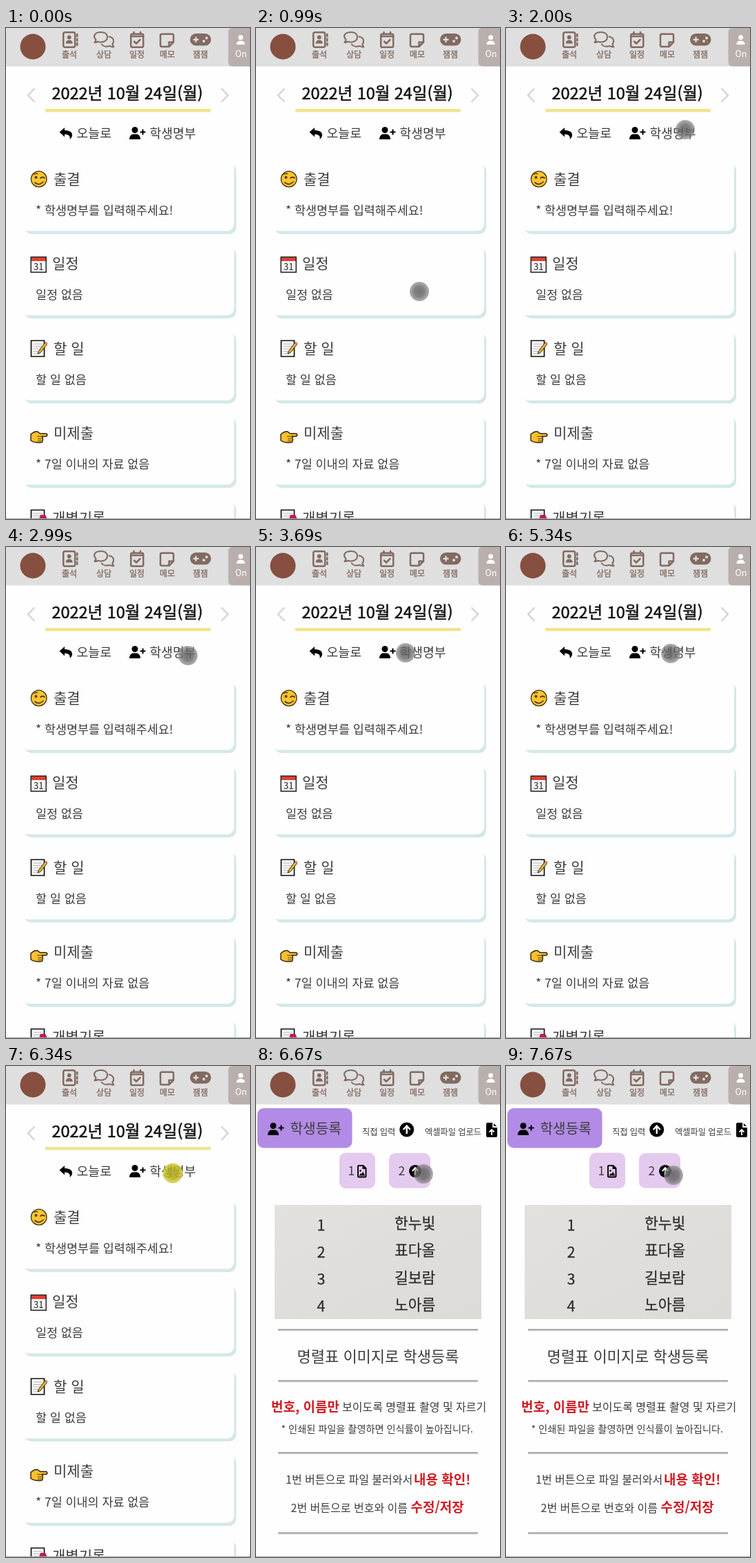
Animation, 354 px wide and 710 px high, one loop 8 s. Source, as an HTML page:

```html
<!DOCTYPE html>
<html lang="ko">
<head>
<meta charset="utf-8">
<style>
  html, body { margin: 0; width: 100%; height: 100%; overflow: hidden; background: #fefefe; }
  svg { display: block; }
  text { font-family: "Noto Sans CJK KR", "Noto Sans CJK", sans-serif; font-weight: 300; fill: #3c3c3c; white-space: pre; }
  .tab text { font-size: 12px; fill: #826a60; stroke: #826a60; stroke-width: .3; }
  .line { fill: none; stroke: #826a60; stroke-width: 2.5; stroke-linejoin: round; stroke-linecap: round; }
  .brown { fill: #826a60; }
  .tab .on { font-size: 12.5px; fill: #fff; stroke: none; }
  .date { font-size: 23.45px; fill: #111; stroke: #111; stroke-width: .5; }
  .head { font-size: 21px; }
  .body { font-size: 17.4px; }
  .mid { font-size: 16px; }
  .small { font-size: 12.2px; }
  .red { font-size: 19px; font-weight: 700; fill: #d01c24; }
  .photo text { font-size: 21.5px; fill: #2c2c2c; stroke: #2c2c2c; stroke-width: .25; }
</style>
</head>
<body>
<svg width="354" height="710" viewBox="0 0 354 710">
  <defs>
    <symbol id="addUser" viewBox="0 0 24 18" width="24" height="18">
      <circle cx="8" cy="4.5" r="4.5"/>
      <path d="M0 18c0-5 3-7.5 6-7.5h4c3 0 6 2.5 6 7.5z"/>
      <path d="M19.5 3.5v8M15.5 7.5h8" stroke="#000" stroke-width="2"/>
    </symbol>
    <g id="up">
      <circle r="10.5"/>
      <path d="M0 6V-5M-5 0L0-5.4 5 0" fill="none" stroke="#fff" stroke-width="2.4"/>
    </g>
    <g id="rule">
      <rect x="32" width="290" height="3" fill="#d8d8d8"/>
      <path d="M32 .7H322" stroke="#979797" stroke-width="1.4"/>
    </g>
    <g id="sheet">
      <path d="M1 1H20V24H1Z" fill="#fafafa" stroke="#111" stroke-width="1.7"/>
      <path d="M4 6H17M4 9.5H17M4 13H15M4 16.5H12M4 20H12" stroke="#b4b4b4" stroke-width="1.2"/>
    </g>
    <linearGradient id="paper" x2="1" y2="1">
      <stop offset="0" stop-color="#e2e1de"/>
      <stop offset="1" stop-color="#dcdbd8"/>
    </linearGradient>
    <radialGradient id="grey">
      <stop offset="0" stop-color="#5c5c5c" stop-opacity=".85"/>
      <stop offset=".55" stop-color="#686868" stop-opacity=".82"/>
      <stop offset=".78" stop-color="#7c7c7c" stop-opacity=".75"/>
      <stop offset="1" stop-color="#8c8c8c" stop-opacity=".7"/>
    </radialGradient>
    <radialGradient id="yellow">
      <stop offset="0" stop-color="#aaa31c" stop-opacity=".9"/>
      <stop offset=".55" stop-color="#b4ad1c" stop-opacity=".88"/>
      <stop offset=".75" stop-color="#c8c22a" stop-opacity=".85"/>
      <stop offset="1" stop-color="#d3cd48" stop-opacity=".8"/>
    </radialGradient>
  </defs>

  <rect width="354" height="710" fill="#fefefe"/>

  <g class="tab">
    <rect width="354" height="55.5" fill="#dfdfdf"/>
    <circle cx="39" cy="27" r="18.5" fill="#864f40"/>

    <rect class="line" x="83.2" y="6.2" width="17" height="21.6" rx="2.5"/>
    <circle class="brown" cx="91.7" cy="13.4" r="2.9"/>
    <path class="brown" d="M86.7 22.5c0-3.5 2-5 5-5s5 1.5 5 5z"/>
    <path class="line" d="M103.3 9v3M103.3 15.5v3M103.3 22v3"/>
    <text x="81" y="42.5">출석</text>

    <g class="line" style="stroke-width:2.1px">
      <path d="M129 20c1-1 1.700-2 1.400-3.200C125 11 130 6 137.500 6S147 9.500 147 13.500 143 20.500 137.500 20.500c-2 0-3-.3-4-.7-1.500.8-3 1.200-5 1.200z"/>
      <path d="M149.500 12.500c5 .7 7 4 6.500 7.500-.2 1.500-1 2.500-1.700 3.500.2 1.500 1 2.500 2 3.800-2 .2-4-.3-5.500-1.300-5 1.500-10 .5-12-2.500"/>
    </g>
    <text x="131" y="42.5">상담</text>

    <rect class="line" x="181.2" y="8.7" width="18" height="19" rx="2"/>
    <path class="line" d="M181 12H199M185.5 6V9M195 6V9M186 19.5l3 3 5.5-5.5"/>
    <text x="179" y="42.5">일정</text>

    <path class="line" d="M226 8.7H241Q243 8.7 243 10.7V20.5L236.5 27H226Q224 27 224 25V10.7Q224 8.7 226 8.7ZM243 20.5H236.5V27"/>
    <text x="223" y="42.5">메모</text>

    <rect class="brown" x="267" y="8" width="30.5" height="17.5" rx="8.7"/>
    <path d="M275.5 12.8v8M271.5 16.8h8" stroke="#dfdfdf" stroke-width="2.2"/>
    <circle cx="287" cy="19" r="1.9" fill="#dfdfdf"/>
    <circle cx="291" cy="14.5" r="1.9" fill="#dfdfdf"/>
    <text x="271" y="42.5">잼잼</text>

    <path d="M354 0V55.5H329Q322.5 55.5 322.5 49V6Q322.5 0 328 0Z" fill="#b9b0ad"/>
    <circle cx="340.5" cy="13.7" r="3.4" fill="#fff"/>
    <path d="M334.5 24c0-4 2.5-5.5 6-5.5s6 1.5 6 5.5z" fill="#fff"/>
    <text class="on" x="332.5" y="41.5">On</text>
  </g>

  <g id="home">
    <path d="M41.5 87.5L32 97.3 41.5 107M312.5 87.5L322 97.3 312.5 107" fill="none" stroke="#d6d6d6" stroke-width="2.5"/>
    <text class="date" x="66.5" y="102.8">2022년 10월 24일(월)</text>
    <rect x="57" y="117" width="240" height="4.5" fill="#f0e48c"/>
    <path d="M77.5 150.5L85 144V148C92 148 96 150 96 155c0 2.500-1.500 4.500-3.500 5.700 1-4.500-1.500-7-7.500-7V157.500Z"/>
    <text x="102.5" y="158.5" style="font-size:18.3px">오늘로</text>
    <use href="#addUser" x="179" y="143"/>
    <text x="208.5" y="158.5" style="font-size:18.2px">학생명부</text>

    <g id="cards"></g>

    <circle cx="47.7" cy="218.5" r="11.3" fill="#fcc52d" stroke="#3b2a10" stroke-width="1.3"/>
    <circle cx="43.5" cy="216" r="2" fill="#5b3a1c"/>
    <path d="M41 211.500q2-2 4.500-.8M50 217q3-2.500 6 0M42 223.500q6 5 12-1" fill="none" stroke="#5b3a1c" stroke-width="1.7" stroke-linecap="round"/>

    <rect x="36.2" y="331.2" width="22" height="22" fill="#f5f5f5"/>
    <rect x="36" y="331" width="22.5" height="6" fill="#e0402e"/>
    <rect x="36.2" y="331.2" width="22" height="22" fill="none" stroke="#222" stroke-width="1.5"/>
    <text x="40" y="350" style="font-size:13px;fill:#222">31</text>

    <use href="#sheet" x="35.500" y="451"/>
    <path d="M47 468L56.500 455 59.500 457.500 50 469.500 46 471Z" fill="#f2b632" stroke="#2b200e"/>
    <path d="M56.500 455l1.300-1.700 3 2.500-1.300 1.700z" fill="#e7868c"/>

    <g transform="translate(0 1.500)">
      <path d="M36 586q5-4.500 9.500-4l4 3h8q2.300 0 2.300 2t-2.300 2h-6q2.500 1 1.500 3 1.200 1.500 0 3 .5 3-3 3h-5q-5 0-9-3z" fill="#fbc02d" stroke="#2b200e" stroke-width="1.400"/>
      <path d="M45 589h6M46 592.500h6M46 595.500h6" stroke="#5a4110"/>
    </g>

    <use href="#sheet" x="35.500" y="696"/>
    <path d="M50 704h7l3 6H48z" fill="#c2185b"/>
  </g>

  <g id="signup">
    <rect x="2" y="61" width="137.5" height="57.5" rx="9" fill="#b28be6"/>
    <use href="#addUser" x="17" y="82"/>
    <text x="49.5" y="98" style="font-size:20.2px">학생등록</text>
    <text class="small" x="154" y="99.5">직접 입력</text>
    <use href="#up" x="218.7" y="92"/>
    <text class="small" x="245" y="99.5">엑셀파일 업로드</text>
    <path d="M336 82h8l6 6v13q0 2-2 2h-12q-2 0-2-2V84q0-2 2-2z"/>
    <path d="M344 82v6h6M342 100v-8M338.5 95.5l3.5-3.5 3.5 3.5" fill="none" stroke="#fff" stroke-width="1.8"/>

    <rect x="121" y="125.5" width="52" height="51.5" rx="9" fill="#e3caee"/>
    <rect x="193" y="126" width="60" height="50.5" rx="9" fill="#e3caee"/>
    <text class="body" x="133.5" y="158">1</text>
    <path d="M149 144h6.5l4 4v11.5q0 1-1 1h-9.5q-1 0-1-1V145q0-1 1-1zM155.5 144v4h4" fill="none" stroke="#000" stroke-width="1.9"/>
    <path d="M149.5 158.5l2.5-3.5 1.2 1.2 2-3.2 3 5.5z"/>
    <circle cx="151.5" cy="151.5" r="1.3"/>
    <text class="body" x="206.5" y="158">2</text>
    <use href="#up" transform="translate(231 152) scale(.86)"/>

    <g class="photo">
      <rect x="27" y="201" width="300" height="165" fill="url(#paper)"/>
      <g id="names"></g>
    </g>

    <use href="#rule" y="380.5"/>
    <use href="#rule" y="454.5"/>
    <use href="#rule" y="558.5"/>
    <use href="#rule" y="674.5"/>

    <text x="59.5" y="428" style="font-size:22px">명렬표 이미지로 학생등록</text>
    <text class="red" x="22" y="499.5">번호, 이름만</text>
    <text class="mid" x="125" y="499">보이도록 명렬표 촬영 및 자르기</text>
    <text x="36.5" y="529.5" style="font-size:14.2px">* 인쇄된 파일을 촬영하면 인식률이 높아집니다.</text>
    <text class="mid" x="43" y="604">1번 버튼으로 파일 불러와서</text>
    <text class="red" x="229" y="604.5">내용 확인!</text>
    <text class="mid" x="50.5" y="644.5">2번 버튼으로 번호와 이름</text>
    <text class="red" x="224.5" y="645">수정/저장</text>
  </g>

  <path d="M0 709.5H354" stroke="#a9a9a9"/>
  <circle id="cursor"/>
</svg>

<script>
const $ = id => document.getElementById(id);
const LOOP = 8000, PRESS = 6340, OPEN = 6670;

const cards = [
  ["출결", "* 학생명부를 입력해주세요!", 69],
  ["일정", "일정 없음", 67],
  ["할 일", "할 일 없음", 69],
  ["미제출", "* 7일 이내의 자료 없음", 69],
  ["개별기록", "", 67],
];
$("cards").innerHTML = cards.map(([title, note, x], i) => `
  <g transform="translate(0 ${Math.round(i * 122.4)})">
    <rect x="27" y="196" width="307" height="102" rx="10" fill="#d4e8e8"/>
    <rect x="23" y="192" width="308" height="101.5" rx="10" fill="#fefefe"/>
    <text class="head" x="${x}" y="226">${title}</text>
    <text class="body" x="43" y="270.3">${note}</text>
  </g>`).join("");

$("names").innerHTML = ["한누빛", "표다올", "길보람", "노아름"].map((name, i) => `
  <text x="88.5" y="${238 + i * 39}">${i + 1}</text>
  <text x="201" y="${234.5 + i * 39.5}">${name}</text>`).join("");

// The pointer jumps: start time, x, y
const jumps = [
  [990, 237, 381], [1320, 266, 115], [2000, 260, 147], [2330, 215, 171],
  [2660, 201, 150], [2990, 264, 157], [3360, 225, 176], [3690, 217, 153],
  [4020, 254, 159], [4350, 204, 165], [4680, 255, 141], [5010, 231, 173],
  [5340, 239, 154], [5670, 243, 156], [PRESS, 242, 155], [OPEN, 243, 156],
  [7670, 243, 158],
];

function draw(now) {
  const t = now % LOOP;
  const opened = t >= OPEN;
  $("home").style.display = opened ? "none" : "";
  $("signup").style.display = opened ? "" : "none";

  const jump = jumps.filter(j => j[0] <= t).pop();
  const cursor = $("cursor");
  cursor.style.display = jump ? "" : "none";
  if (jump) {
    const pressed = t >= PRESS && !opened;
    cursor.setAttribute("cx", jump[1]);
    cursor.setAttribute("cy", jump[2]);
    cursor.setAttribute("r", pressed ? 14.5 : 14);
    cursor.setAttribute("fill", pressed ? "url(#yellow)" : "url(#grey)");
  }
}

const start = performance.now();
function tick() {
  draw(performance.now() - start);
  requestAnimationFrame(tick);
}
tick();
</script>
</body>
</html>
```
